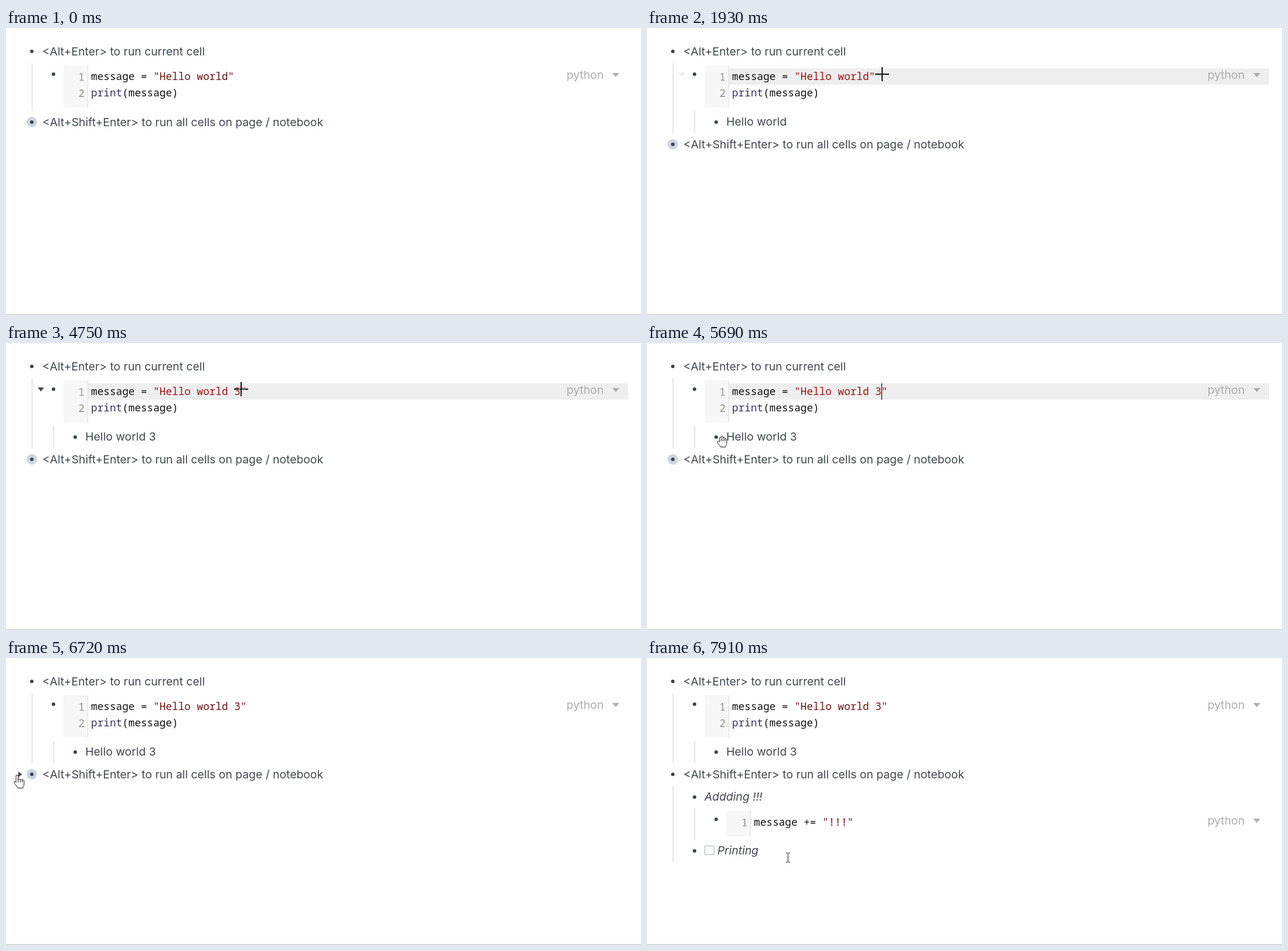
Write an HTML page that moves like this. It is 1083 px wide and 491 px high and loops after 7990 ms.

```html
<!DOCTYPE html>
<html lang="en">
<head>
<meta charset="utf-8">
<title>Running cells</title>
<style>
html, body { margin: 0; width: 100%; height: 100%; overflow: hidden; background: #fff; }
svg { display: block; width: 1083px; height: 491px; }
text { white-space: pre; fill: #414852; font: 400 19.32px Inter, sans-serif; font-optical-sizing: none; }
.code, .code tspan, .num { font: 300 17.7px "Noto Sans Mono", monospace; }
.code { fill: #111; }
.code .str { fill: #6e1414; }
.code .fn { fill: #3b3060; }
.num { fill: #909090; text-anchor: end; }
.lang { fill: #adadad; }
.em { font-style: italic; }
.dot { fill: #3a444e; }
.guide { fill: #c9d1d9; }
.gutter { fill: #f7f7f7; }
.edge { fill: #ddd; }
.fold { fill: #4c4c4c; }
.arrow { fill: #fff; stroke: #111; stroke-linejoin: round; }
</style>
</head>
<body>
<svg viewBox="0 0 1083 491">
  <defs>
    <g id="lang">
      <text class="lang" x="956" y="87">python</text>
      <path d="M1034 77h12l-6 7z" fill="#adadad"/>
    </g>
  </defs>
  <rect width="1083" height="491" fill="#fff"/>
  <rect y="490" width="1083" height="1" fill="#bdbdbd"/>

  <circle class="dot" cx="44" cy="40" r="3"/>
  <text x="61.800" y="46.500">&lt;Alt+Enter&gt; to run current cell</text>
  <rect id="guide" class="guide" x="44" y="60" width="1" height="82"/>
  <circle class="dot" cx="81" cy="79" r="3"/>
  <path id="fold1" class="fold" d="M54 76h11l-5.500 7z"/>
  <rect class="gutter" x="98" y="64" width="41" height="72"/>
  <rect class="edge" x="139" y="64" width="1" height="72"/>
  <rect id="active" x="140" y="69" width="921" height="28" fill="#eee"/>
  <use href="#lang"/>
  <text class="num" x="134" y="89.500">1</text>
  <text class="num" x="134" y="117.500">2</text>
  <text class="code" x="145.100" y="89">message = <tspan id="str" class="str"></tspan></text>
  <text class="code" x="145.100" y="117"><tspan class="fn">print</tspan>(message)</text>

  <g id="output">
    <rect class="guide" x="81" y="142" width="1" height="38"/>
    <circle class="dot" cx="118" cy="161" r="3"/>
    <text id="result" x="135.200" y="167.300"></text>
  </g>

  <g id="second">
    <circle id="halo" cx="44" cy="161" r="9" fill="#cfd5df"/>
    <circle class="dot" cx="44" cy="161" r="3"/>
    <path id="fold2" class="fold" d="M21 156v10l6.500-5z"/>
    <text x="61.900" y="167.500">&lt;Alt+Shift+Enter&gt; to run all cells on page / notebook</text>
  </g>

  <g id="children">
    <rect class="guide" x="44" y="219" width="1" height="130"/>
    <circle class="dot" cx="81" cy="238" r="3"/>
    <text class="em" x="98" y="244">Addding !!!</text>
    <rect class="guide" x="81" y="257" width="1" height="54"/>
    <circle class="dot" cx="118" cy="276" r="3"/>
    <rect class="gutter" x="135" y="261" width="41" height="44"/>
    <rect class="edge" x="176" y="261" width="1" height="44"/>
    <text class="num" x="171.500" y="287.500">1</text>
    <text class="code" x="182.300" y="287">message += <tspan class="str">"!!!"</tspan></text>
    <use href="#lang" y="198"/>
    <circle class="dot" cx="81" cy="330" r="3"/>
    <rect x="98.500" y="321.500" width="16" height="15" rx="1.500" fill="#fff" stroke="#9fb3bf"/>
    <text class="em" x="120" y="336">Printing</text>
  </g>

  <rect id="caret" y="69" width="1.200" height="28" fill="#000"/>
  <circle id="click" r="14.500" fill="#fdee10" fill-opacity=".65"/>

  <path id="cross" d="M389 79h24M401 67v24" stroke="#fff" stroke-width="2" style="mix-blend-mode:difference"/>
  <g id="pointer">
    <path id="beam" d="M-3.500-8h2L0-7l1.500-1h2M0-7V7M-3.500 8h2L0 7l1.500 1h2" fill="none" stroke="#222"/>
    <path id="arrow" class="arrow" d="M.5.5V17l4-3.800L7 19l2.500-1L7 12.400h5z"/>
    <g id="hand">
      <path class="arrow" d="M-1.900 13V2a1.900 1.900 0 0 1 3.800 0V9c0-2.400 3.600-2.400 3.600 0c0-2 3.300-2 3.300.6c0-1.800 3-1.600 3 .8V15c0 4-1.600 5-2 7.500H1.200C.6 20-5 15.500-5.300 12.600c-.2-1.800 2-2 3.400.4z"/>
      <path class="arrow" d="M1.900 9v4m3.600-4v4m3.300-3.400V13"/>
    </g>
    <g id="grab">
      <path class="arrow" d="M-2.500 4V-2.500c0-2 3-2 3 0V-4c0-2 3.200-2 3.200 0v1.500c0-2 3.100-2 3.100 0V0c0-1.800 3-1.800 3 .2V7c0 3-1.500 3.500-1.800 6H-.5C-1 10.500-5.500 7-6 4.500c-.3-1.800 2-2 3.500-.5z"/>
      <path class="arrow" d="M.5-2.500V3m3.200-5.500V3m3.100-3v3"/>
    </g>
  </g>
</svg>
<script>
const LOOP = 7990;
const $ = id => document.getElementById(id);
const show = (id, on) => { $(id).style.visibility = on ? "visible" : "hidden"; };
const within = (t, ...spans) => spans.some(([a, b]) => t >= a && t < b);
const latest = (t, list) => list.reduce((v, [at, next]) => t >= at ? next : v, null);

const typed = [[0, ""], [2880, " "], [3110, " 2"], [4050, " "], [4210, " 3"]];
const results = [[0, ""], [1930, "Hello world"], [3510, "Hello world 2"], [4670, "Hello world 3"]];
const caretCol = [[0, 23], [2640, 22], [2880, 23], [3110, 24], [4050, 23], [4210, 24]];
const altHeld = [[1770, 2170], [3430, 3820], [4510, 4900]];
const caretOn = [[1230, 1770], [2250, 3670], [4050, 4750], [5210, 5770], [6330, 6490]];

// Pointer moves: sampling step, easing, then [time, x, y] stops
const smooth = u => u * u * (3 - 2 * u);
const linear = u => u;
const moves = [
  { step: 78, ease: smooth, stops: [[220, 838, 430], [1000, 403, 80]] },
  { step: 80, ease: linear, stops: [[5290, 403, 80], [5450, 310, 105], [5690, 126, 165], [5930, 36, 206], [6090, 20, 211], [6330, 19, 200]] },
  { step: 80, ease: smooth, stops: [[7030, 19, 200], [7830, 228, 342], [7910, 240, 341]] }
];

function pointerAt(t) {
  const move = moves.filter(m => t >= m.stops[0][0]).pop();
  if (!move) return null;
  const { step, ease, stops } = move;
  const start = stops[0][0];
  const s = start + Math.floor((t - start) / step) * step;
  const i = stops.findIndex(p => p[0] > s);
  if (i < 0) return stops[stops.length - 1].slice(1);
  const [a, b] = [stops[i - 1], stops[i]];
  const u = ease((s - a[0]) / (b[0] - a[0]));
  return [a[1] + (b[1] - a[1]) * u, a[2] + (b[2] - a[2]) * u];
}

function pointerShape(t, [x, y]) {
  if (x < 34 && y > 185 && y < 215) return "hand";
  if (y < 136) return "beam";
  if (t > 5000 && t < 7000 && y < 180) return x > 136 ? "beam" : x > 108 ? "grab" : "arrow";
  return t > 7000 && x > 135 ? "beam" : "arrow";
}

function draw(t) {
  const ran = t >= 1930, open = t >= 6800;
  const shift = ran ? 38 : 0;
  const focused = within(t, [1230, 6490]);
  const alt = within(t, ...altHeld);
  const pos = pointerAt(t);

  $("str").textContent = `"Hello world${latest(t, typed)}"`;
  $("str").style.fill = focused ? "#9c1414" : "#6e1414";
  $("result").textContent = latest(t, results);
  show("output", ran);
  $("guide").setAttribute("height", 82 + shift);
  $("second").setAttribute("transform", `translate(0 ${shift})`);
  show("halo", !open);
  show("children", open);
  show("active", focused);

  show("caret", within(t, ...caretOn));
  $("caret").setAttribute("x", 144.4 + 10.64 * latest(t, caretCol));

  show("fold1", ran && pos[1] < 136);
  $("fold1").style.opacity = t < 2010 ? 0.1 : 1;
  show("fold2", t > 5800 && pos[0] < 90 && pos[1] > 185 && pos[1] < 218);
  const turn = t < 6800 ? 0 : t < 6880 ? 45 : 90;
  $("fold2").setAttribute("transform", `rotate(${turn} 23.5 161)`);

  const firstClick = within(t, [1230, 1380]);
  show("click", firstClick || within(t, [6490, 6720]));
  $("click").setAttribute("transform", firstClick ? "translate(401.5 79)" : "translate(19 200)");

  show("cross", alt);
  const shape = pos && !alt ? pointerShape(t, pos) : "";
  for (const id of ["beam", "arrow", "hand", "grab"]) show(id, id === shape);
  if (pos) {
    const [x, y] = pos.map(Math.round);
    const nudge = shape === "beam" ? 0.5 : 0;
    $("pointer").setAttribute("transform", `translate(${x + nudge} ${y + nudge})`);
  }
}

function tick() {
  draw(performance.now() % LOOP);
  requestAnimationFrame(tick);
}
tick();
</script>
</body>
</html>
```
